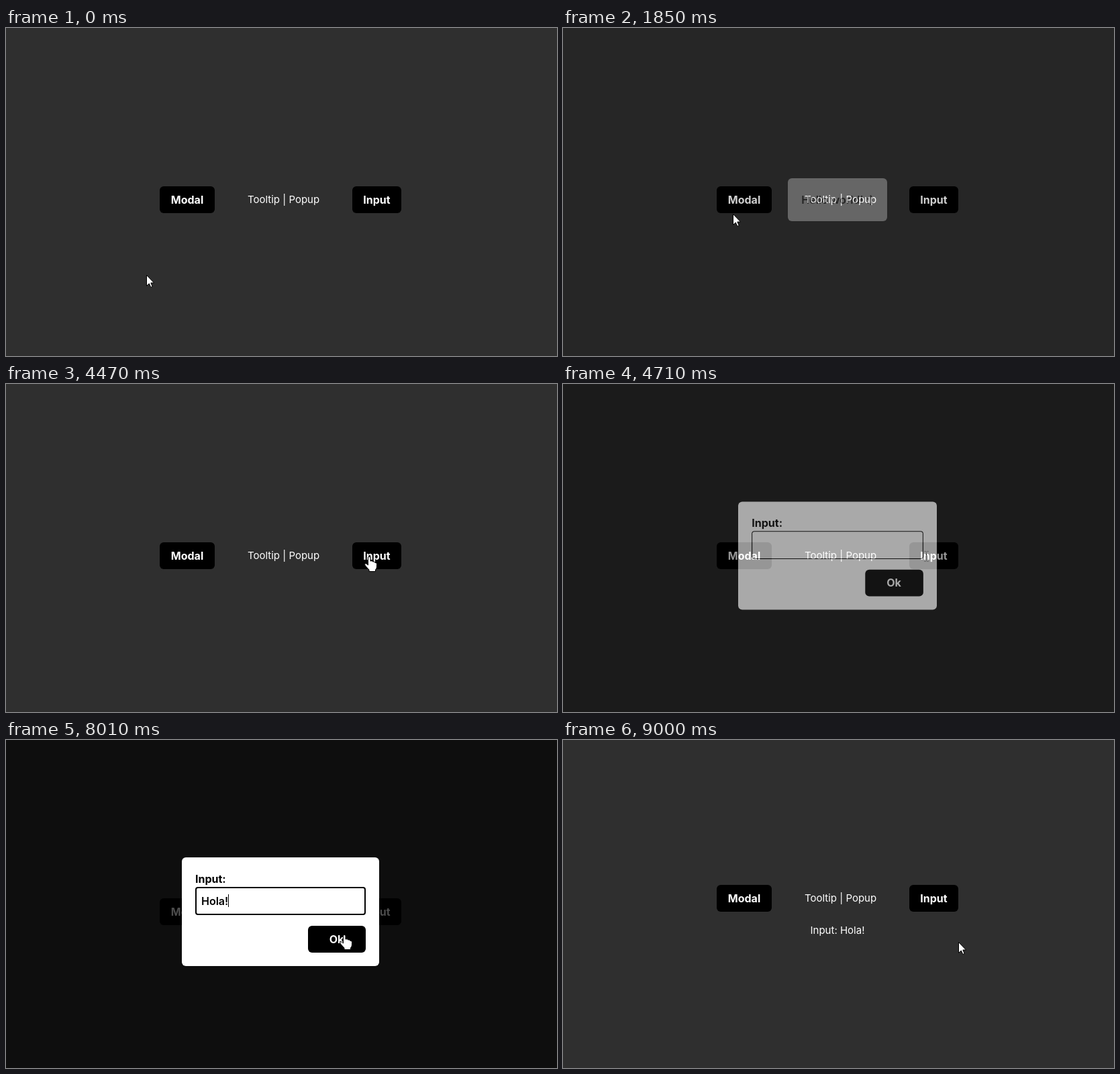
These frames come from a looping animation (821 by 489 pixels, 9020 ms). An HTML page with a canvas:

```html
<!DOCTYPE html>
<html lang="en">
<head>
<meta charset="utf-8">
<title>Modal, tooltip and input</title>
<style>
  html, body { margin: 0; width: 100%; height: 100%; overflow: hidden; background: #2f2f2f; }
  canvas { display: block; }
</style>
</head>
<body>
<canvas id="stage" width="821" height="489"></canvas>
<script>
const W = 821, H = 489, LOOP = 9020;
const CENTER = { x: 409, y: 256 };
const OPEN_MS = 400, CLOSE_MS = 300;
const HELLO = { open: 630, close: 1630 };
const FORM = { open: 4475, focus: 5230, close: 8060 };
const TIP = { open: 2550, close: 3600 };
const ANSWER = "Hola!";
const KEY_TIMES = [6040, 6150, 6300, 6380, 6690];

const ctx = document.getElementById("stage").getContext("2d");
const layer = document.createElement("canvas");
layer.width = W;
layer.height = H;
const layerCtx = layer.getContext("2d");

const clamp = v => Math.min(1, Math.max(0, v));
const mix = (a, b, p) => a + (b - a) * p;

// CSS "ease": cubic-bezier(.25, .1, .25, 1)
function ease(x) {
  const curve = (a, b, s) => 3 * a * s * (1 - s) ** 2 + 3 * b * s * s * (1 - s) + s ** 3;
  let lo = 0, hi = 1;
  for (let i = 0; i < 24; i++) {
    const mid = (lo + hi) / 2;
    if (curve(.25, .25, mid) < x) lo = mid; else hi = mid;
  }
  return curve(.1, 1, lo);
}

function jelly(p) {
  const offsets = [0, .1, -.1, .05, 0];
  const i = Math.min(3, Math.floor(p * 4));
  const stretch = mix(offsets[i], offsets[i + 1], ease(p * 4 - i));
  return { x: 1 - stretch, y: 1 + stretch };
}

function box(c, x, y, w, h, r, color) {
  c.fillStyle = color;
  c.beginPath();
  c.roundRect(x, y, w, h, r);
  c.fill();
}

function text(c, str, x, y, { size = 16, weight = 700, color = "#fff", align = "center" } = {}) {
  c.font = `${weight} ${size}px Inter, sans-serif`;
  c.fillStyle = color;
  c.textAlign = align;
  c.fillText(str, x, y + size * .36);
}

function drawPage(t) {
  const submitted = t >= FORM.close;
  const y = submitted ? 236 : 256;
  ctx.fillStyle = "#2f2f2f";
  ctx.fillRect(0, 0, W, H);
  box(ctx, 229, y - 20, 82, 40, 6, "#000");
  box(ctx, 516, y - 20, 73, 40, 6, "#000");
  text(ctx, "Modal", 270, y);
  text(ctx, "Input", 552.5, y);
  text(ctx, "Tooltip | Popup", 413.5, y, { size: 15, weight: 400 });
  if (submitted) text(ctx, "Input: " + ANSWER, 409, 284, { size: 15, weight: 400 });
}

function drawTooltip(t) {
  const shown = ease(clamp((t - TIP.open) / 400)) * (1 - ease(clamp((t - TIP.close) / 300)));
  if (shown <= 0) return;
  ctx.save();
  ctx.globalAlpha = shown;
  ctx.translate(0, 9 * (1 - shown));
  box(ctx, 365, 200, 97, 34, 6, "#fff");
  text(ctx, "Hello world! :)", 413.5, 217, { size: 12, weight: 600, color: "#000" });
  ctx.restore();
}

function drawDialog(t, { open, close }, paint) {
  if (t < open || t > close + CLOSE_MS) return;
  const p = clamp((t - open) / OPEN_MS);
  const scale = jelly(p);
  const c = layerCtx;
  c.clearRect(0, 0, W, H);
  c.fillStyle = "rgba(0, 0, 0, .7)";
  c.fillRect(0, 0, W, H);
  c.save();
  c.translate(CENTER.x, CENTER.y);
  c.scale(scale.x, scale.y);
  c.translate(-CENTER.x, -CENTER.y);
  paint(c, t);
  c.restore();
  ctx.globalAlpha = p * (1 - clamp((t - close) / CLOSE_MS));
  ctx.drawImage(layer, 0, 0);
  ctx.globalAlpha = 1;
}

function paintHello(c) {
  box(c, 335, 224, 148, 64, 6, "#fff");
  text(c, "Hello world! :)", 409, 256, { weight: 600, color: "#000" });
}

function paintForm(c, t) {
  const focused = t >= FORM.focus;
  const border = focused ? 2 : 1;
  box(c, 262, 175, 294, 162, 6, "#fff");
  text(c, "Input:", 282, 207, { color: "#000", align: "left" });
  box(c, 282, 219, 254, 42, 4, "#000");
  box(c, 282 + border, 219 + border, 254 - 2 * border, 42 - 2 * border, 4 - border, "#fff");
  box(c, 450, 277, 86, 40, 6, "#000");
  text(c, "Ok", 492.5, 297);

  const typed = ANSWER.slice(0, KEY_TIMES.filter(k => t >= k).length);
  text(c, typed, 291, 240, { weight: 600, color: "#000", align: "left" });
  const blinkedOff = (t >= 5720 && t < KEY_TIMES[0]) || (t >= 7300 && t < 7800) || t >= 8300;
  if (focused && !blinkedOff) {
    c.fillRect(Math.round(291 + c.measureText(typed).width), 230, 1, 19);
  }
}

// Pointer path: time, x, y
const PATH = [
  [0, 209, 368], [20, 209, 368], [150, 207, 345], [300, 232, 282], [460, 250, 257],
  [1640, 250, 257], [1850, 253, 277], [2050, 285, 322], [2280, 370, 304], [2530, 410, 255],
  [3590, 410, 255], [3760, 450, 285], [3980, 536, 298], [4120, 547, 270], [4230, 541, 257],
  [4770, 541, 257], [5050, 480, 248], [5320, 434, 251],
  [5480, 434, 251], [5510, 431, 264],
  [7050, 431, 264], [7180, 438, 224], [7330, 478, 284], [7460, 502, 314], [7590, 504, 290],
  [8670, 504, 290], [8840, 553, 293], [9000, 589, 301], [9020, 589, 301]
];

const POINTERS = [
  [0, "arrow"], [400, "hand"], [650, "arrow"], [2490, "beam"], [3660, "arrow"], [4110, "hand"],
  [4490, "beam"], [5500, "arrow"], [7090, "beam"], [7290, "arrow"], [7350, "hand"], [8360, "arrow"]
];

function slope(i, k) {
  const a = PATH[i - 1], b = PATH[i], c = PATH[i + 1];
  const still = (m, n) => !m || !n || (m[1] === n[1] && m[2] === n[2]);
  return still(a, b) || still(b, c) ? 0 : (c[k] - a[k]) / (c[0] - a[0]);
}

function pointerAt(t) {
  const i = Math.max(0, PATH.findIndex(p => p[0] > t) - 1);
  const a = PATH[i], b = PATH[i + 1], d = b[0] - a[0], s = (t - a[0]) / d;
  const along = k =>
    mix(a[k], b[k], s * s * (3 - 2 * s)) +
    s * (1 - s) * d * ((1 - s) * slope(i, k) - s * slope(i + 1, k));
  return [Math.round(along(1)), Math.round(along(2))];
}

const SHAPES = {
  arrow: new Path2D("M.5 .5V16.5L4.3 13L6.8 18.5L9.2 17.5L6.8 12H11.5Z"),
  hand: new Path2D("M-1.5 13V2Q-1.5 .5 .3 .5Q2 .5 2 2V7Q5 5.8 5.5 8Q8.3 7 8.7 9.2" +
    "Q11.5 8.8 11.5 11.5V15Q11.5 18 9.5 20V22.5H0V20L-5.5 14Q-7.5 11.5 -5.5 10.7Q-4 10.3 -1.5 13Z")
};

function drawPointer(t) {
  const kind = POINTERS.filter(p => t >= p[0]).pop()[1];
  ctx.save();
  ctx.translate(...pointerAt(t));
  if (kind === "beam") {
    // Inverts whatever lies below
    ctx.globalCompositeOperation = "difference";
    ctx.fillStyle = "#fff";
    ctx.fillRect(0, -7, 1, 14);
    for (const y of [-8, 7]) {
      ctx.fillRect(-3, y, 3, 1);
      ctx.fillRect(1, y, 3, 1);
    }
  } else {
    ctx.fillStyle = "#fff";
    ctx.strokeStyle = "#000";
    ctx.lineWidth = 1;
    ctx.fill(SHAPES[kind]);
    ctx.stroke(SHAPES[kind]);
  }
  ctx.restore();
}

const start = performance.now();

function render() {
  const t = Math.max(0, performance.now() - start) % LOOP;
  drawPage(t);
  drawTooltip(t);
  drawDialog(t, HELLO, paintHello);
  drawDialog(t, FORM, paintForm);
  drawPointer(t);
  requestAnimationFrame(render);
}

render();
</script>
</body>
</html>
```
